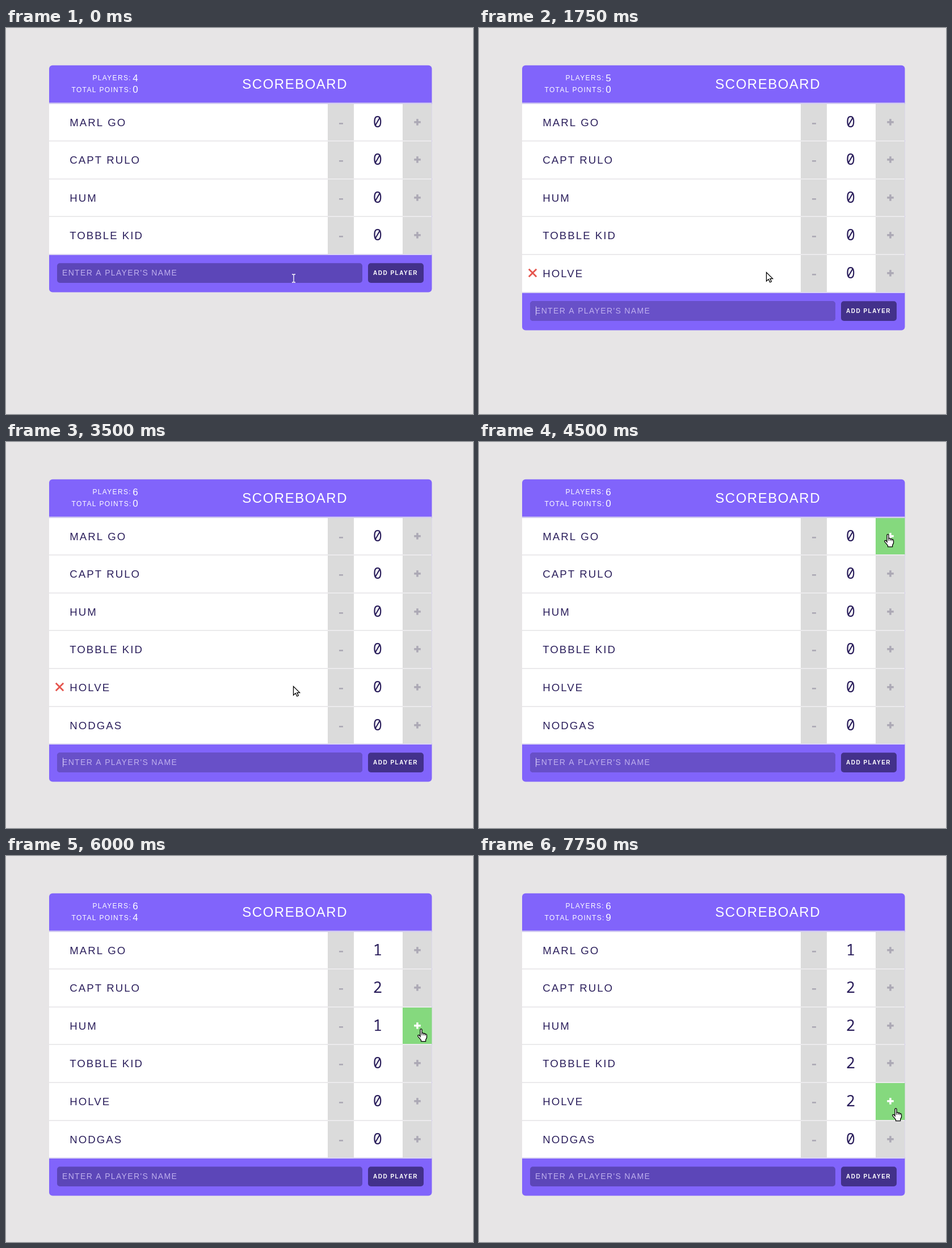
An HTML page with a canvas for the animation above (8000 ms loop, 823 by 680 pixels).

```html
<!DOCTYPE html>
<html lang="en">
<head>
<meta charset="utf-8">
<title>Scoreboard</title>
<style>
html, body { margin: 0; width: 100%; height: 100%; overflow: hidden; background: #e7e5e6; }
canvas { display: block; width: 823px; height: 680px; }
</style>
</head>
<body>
<canvas id="stage" width="823" height="680"></canvas>
<script>
const ctx = document.getElementById('stage').getContext('2d');
const LOOP = 8000, STEP = 250, FADE = 260;
const SANS = '"Liberation Sans", Arial, sans-serif';
const MONO = '"Noto Sans Mono", "DejaVu Sans Mono", monospace';
const PURPLE = '#8164fb', INK = '#2b1f5c', GREY = '#dbdbdb', MARK = '#aca9b5';
const LEFT = 76, MINUS = 567, SCORE = 613, PLUS = 699, RIGHT = 750.5;
const WIDTH = RIGHT - LEFT;

// A player is typed in between `typed` and `joined`, then scores once per step from `first` on.
const players = [
  { name: 'MARL GO', first: 4750, points: 1 },
  { name: 'CAPT RULO', first: 5250, points: 2 },
  { name: 'HUM', first: 6000, points: 2 },
  { name: 'TOBBLE KID', first: 6750, points: 2 },
  { name: 'HOLVE', typed: 1000, joined: 1750, first: 7500, points: 2 },
  { name: 'NODGAS', typed: 2500, joined: 3500, first: LOOP, points: 0 }
];

// Pointer stops: time, x, y
const path = [
  [0, 507, 441], [500, 506, 430], [3950, 506, 430], [4500, 720, 162],
  [4750, 720, 162], [5000, 720, 274], [5250, 726, 236], [5500, 726, 236],
  [6000, 731, 304], [6250, 748, 379], [7000, 736, 370], [7250, 736, 412],
  [7750, 734, 444]
];

const clamp = (v, lo = 0, hi = 1) => Math.min(hi, Math.max(lo, v));
const easeOut = p => 1 - (1 - p) ** 5;
const lerp = (a, b, k) => a + (b - a) * k;
const rowTop = i => Math.round(133.6 + 66.6 * i);
const scoreOf = (p, t) => clamp(Math.floor((t - p.first) / STEP) + 1, 0, p.points);

function pointerAt(t) {
  const next = path.findIndex(k => k[0] > t);
  if (next < 1) return path[next < 0 ? path.length - 1 : 0].slice(1);
  const [t0, x0, y0] = path[next - 1], [t1, x1, y1] = path[next];
  const k = easeOut((t - t0) / (t1 - t0));
  return [lerp(x0, x1, k), lerp(y0, y1, k)];
}

// Share of the last fade time that the pointer spent inside a cell
function dwell(t, x0, x1, y0, y1) {
  const samples = 26;
  let hits = 0;
  for (let i = 0; i < samples; i++) {
    const [x, y] = pointerAt(Math.max(0, t - FADE * (i + 0.5) / samples));
    if (x >= x0 && x < x1 && y >= y0 && y < y1) hits++;
  }
  return hits / samples;
}

function typedText(t) {
  const p = players.find(p => p.typed <= t && t < p.joined);
  if (!p) return '';
  const share = (t + STEP - p.typed) / (p.joined - p.typed);
  return p.name.slice(0, Math.ceil(p.name.length * share));
}

function rect(x, y, w, h, color) {
  ctx.fillStyle = color;
  ctx.fillRect(x, y, w, h);
}

function round(x, y, w, h, r, color) {
  ctx.fillStyle = color;
  ctx.beginPath();
  ctx.roundRect(x, y, w, h, r);
  ctx.fill();
}

function text(str, x, y, size, spacing, color, font = SANS, weight = 400) {
  ctx.font = `${weight} ${size}px ${font}`;
  ctx.letterSpacing = spacing + 'px';
  ctx.fillStyle = color;
  ctx.fillText(str, x, y);
}

// Paints a second colour over what is there with the given strength
function fade(alpha, paint) {
  ctx.globalAlpha = alpha;
  paint();
  ctx.globalAlpha = 1;
}

function header(count, total) {
  text('PLAYERS:', 152.5, 92, 12, 1.33, '#fff');
  text(count, 223.3, 94, 17, 0, '#fff');
  text('TOTAL POINTS:', 115.5, 112.7, 12, 1.33, '#fff');
  text(total, 223.3, 114.3, 17, 0, '#fff');
  text('SCOREBOARD', 416.3, 106.5, 24, 1.5, '#fff');
}

function plus(cy, color) {
  rect(719.2, cy - 1.9, 11.6, 3.5, color);
  rect(723.2, cy - 5.8, 3.5, 11.4, color);
}

function cross(cx, cy, r) {
  ctx.strokeStyle = '#e5544d';
  ctx.lineWidth = 2.8;
  ctx.beginPath();
  for (const s of [-1, 1]) {
    ctx.moveTo(cx - r, cy - r * s);
    ctx.lineTo(cx + r, cy + r * s);
  }
  ctx.stroke();
}

function row(i, t, last) {
  const y = rowTop(i), bottom = rowTop(i + 1), h = bottom - 2 - y;
  const mid = y + 32.2, cy = Math.round(mid);
  rect(LEFT, y, WIDTH, h, '#fff');
  rect(MINUS, y, SCORE - MINUS, h, GREY);
  rect(PLUS, y, RIGHT - PLUS, h, GREY);
  rect(LEFT, y + h, WIDTH, 2, last ? '#dad5f2' : '#ebeaec');
  rect(587, cy + 1, 7, 2.6, MARK);
  plus(cy, MARK);
  fade(dwell(t, PLUS, RIGHT, y, bottom), () => {
    rect(PLUS, y, RIGHT - PLUS, h, '#85d97e');
    plus(cy, '#fff');
  });
  fade(dwell(t, LEFT, MINUS, y, bottom), () => cross(94.5, mid - 0.7, 6.7));
  text(players[i].name, 112.3, mid + 6.7, 18.67, 2, INK);
  text(scoreOf(players[i], t), 646.8, mid + 8.6, 27, 0, INK, MONO, 500);
}

function footer(top, t) {
  const y = top + 14.3, typed = typedText(t);
  const focus = clamp(Math.min(t, 5000 - t) / 400);
  round(90, y, 538, 34.7, 5, '#5c46b8');
  fade(focus, () => round(90, y, 538, 34.7, 5, '#6850c8'));
  text(typed || "ENTER A PLAYER'S NAME", 99, y + 22, 14, 1.33, typed ? '#fff' : '#bfb0ef');
  if (focus > 0.5) {
    const end = typed ? ctx.measureText(typed).width : 1;
    rect(Math.round(99 + end), y + 9, 1, 16, '#d6ccf5');
  }
  round(638, y, 98, 34.7, 5, '#43318b');
  text('ADD PLAYER', 647, y + 21.1, 10, 1.5, '#fff', SANS, 700);
}

const shapes = {
  arrow: new Path2D('M.5 .5V16L4.2 12.6 6.8 18 9.4 16.8 6.9 11.6H11.6Z'),
  hand: new Path2D('M-1 14V2.5Q-1 .7 .5 .7T2 2.5V8Q3.6 6.8 5 8.8 6.7 7.9 7.8 9.6 10.3 9.2 10.5 12V16L8.6 20V22.6H.5V20.4L-5 13.8Q-5.8 11.4 -3.7 11.4 -2.4 11.6 -1 14Z'),
  knuckles: new Path2D('M2 8V12M5 8.8V12M7.8 9.6V12.5'),
  beam: new Path2D('M-3 -7H-1L0 -6 1 -7H3M0 -6V6M-3 7H-1L0 6 1 7H3')
};

function pointer(t, footerTop) {
  const [x, y] = pointerAt(t);
  const onButton = x > PLUS || (x > MINUS && x < SCORE);
  const kind = y > footerTop ? 'beam' : onButton ? 'hand' : 'arrow';
  ctx.save();
  ctx.translate(Math.round(x), Math.round(y));
  ctx.lineWidth = 1.3;
  ctx.strokeStyle = kind === 'beam' ? '#fff' : '#000';
  ctx.fillStyle = '#fff';
  if (kind !== 'beam') ctx.fill(shapes[kind]);
  ctx.stroke(shapes[kind]);
  ctx.lineWidth = 1;
  if (kind === 'hand') ctx.stroke(shapes.knuckles);
  ctx.restore();
}

function draw(t) {
  const count = players.filter(p => !(p.joined > t)).length;
  const total = players.reduce((sum, p) => sum + scoreOf(p, t), 0);
  const bottom = rowTop(count);
  rect(0, 0, 823, 680, '#e7e5e6');
  round(LEFT, 65.7, WIDTH, bottom - 0.3, 6, PURPLE);
  rect(LEFT, 131.5, WIDTH, 2.5, '#d4cef0');
  header(count, total);
  for (let i = 0; i < count; i++) row(i, t, i === count - 1);
  footer(bottom, t);
  pointer(t, bottom);
}

// The picture advances in whole steps
const start = performance.now();
function tick() {
  const t = (performance.now() - start) % LOOP;
  draw(Math.floor(t / STEP) * STEP);
  requestAnimationFrame(tick);
}
tick();
</script>
</body>
</html>
```
